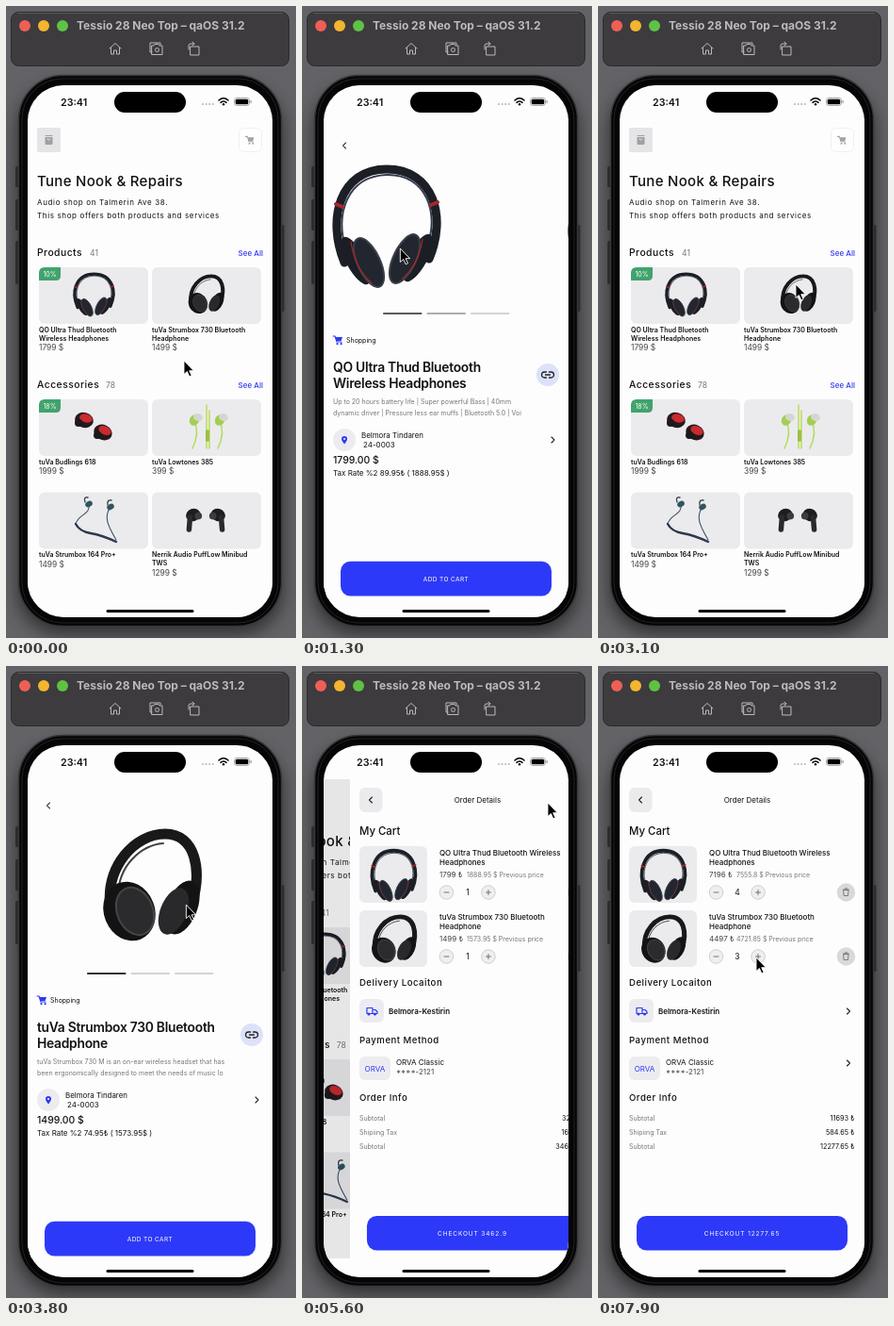
An HTML page that plays this animation: 308x670 px, repeating every 8 s.

```html
<!DOCTYPE html>
<html lang="en">
<head>
<meta charset="utf-8">
<title>Audio shop app</title>
<style>
html, body { margin: 0; width: 100%; height: 100%; overflow: hidden; background: #606064; }
svg { display: block; width: 308px; height: 670px; }
text { font-family: Inter, Roboto, sans-serif; fill: #111; white-space: pre; }
.m { font-weight: 550; }
.b { font-weight: 600; }
.g { fill: #777; }
.d { fill: #444; }
.blue { fill: #2d39f5; }
.w { fill: #fff; }
.end { text-anchor: end; }
.mid { text-anchor: middle; }
.line { fill: none; stroke: #222; stroke-linecap: round; stroke-linejoin: round; }
.band { fill: none; stroke: #1c1f25; stroke-linecap: round; }
.black { stroke: #19191a; }
</style>
</head>
<body>
<svg id="stage" viewBox="0 0 308 670"></svg>
<script>
const LOOP = 8000, WIDTH = 260;
const BLUE = '#2d39f8', CARD = '#ebebee';

// Markup helpers
const text = (x, y, size, str, cls = '', gap = 0, id = '') =>
  `<text x="${x}" y="${y}" font-size="${size}" class="${cls}" letter-spacing="${gap}" ${id && `id="${id}"`}>${str}</text>`;
const rect = (x, y, w, h, r, fill, more = '') =>
  `<rect x="${x}" y="${y}" width="${w}" height="${h}" rx="${r}" fill="${fill}" ${more}/>`;
const circle = (x, y, r, fill, more = '') => `<circle cx="${x}" cy="${y}" r="${r}" fill="${fill}" ${more}/>`;
const oval = (x, y, rx, ry, turn, fill, more = '') =>
  `<ellipse rx="${rx}" ry="${ry}" transform="translate(${x} ${y}) rotate(${turn})" fill="${fill}" ${more}/>`;
const line = (d, color = '#222', w = 1) => `<path class="line" d="${d}" style="stroke:${color};stroke-width:${w}"/>`;
const at = (x, y, sx, sy, body) => `<g transform="translate(${x} ${y}) scale(${sx} ${sy})">${body}</g>`;
const chevron = (x, y, dir, color = '#222') => line(`M${x - dir * 1.5} ${y - 3}l${dir * 3} 3l${-dir * 3} 3`, color, 1.1);

// Product pictures, centred on 0,0
const RED = '#a8272c', rim = 'stroke="#3a3e48" stroke-width="2"';
const frontView = `
  <path class="band" stroke-width="9" d="M-45 38C-64 -8 -50 -61 0 -61S64 -10 45 34"/>
  ${line('M-43 24C-56 -12 -42 -54 0 -55S56 -14 43 20', '#343b4e', 2)}
  ${line('M-54 -24l7 3M54 -26l-7 3', RED, 4)}
  ${oval(-33, 36, 10, 28, -28, '#1b1e25')}${oval(33, 33, 10, 28, 28, '#1b1e25')}
  ${oval(-19, 38, 12, 28, -25, '#22262f', rim)}${oval(19, 34, 12, 28, 25, '#22262f', rim)}
  ${line('M-38 16Q-34 44 -16 60M38 13Q34 40 17 55', RED, 1.2)}`;
const tiltView = `
  <path class="band" stroke-width="13" d="M-34 34C-74 6 -58 -28 -20 -42S40 -52 52 -16"/>
  ${line('M-40 20C-62 0 -44 -24 -14 -36S34 -42 42 -18', '#31384b', 2)}
  ${line('M18 -52l2 10M-60 -3l8 -1', RED, 4)}
  ${oval(39, -2, 14, 29, -8, '#14161b')}${oval(53, -3, 13, 28, -10, '#23262e', rim)}
  ${oval(9, 27, 27, 17, 35, '#14161b')}${line('M-14 8Q14 12 28 38M40 -28Q50 -2 44 22', RED, 1.8)}
  ${oval(-10, 31, 32, 18, 28, '#22252c', rim)}`;
const studioView = `
  <path class="band black" stroke-width="12" d="M-27 38C-38 -30 -20 -61 4 -61S28 -40 36 -16"/>
  ${line('M-20 20C-28 -26 -14 -50 5 -53', '#383838', 2)}
  ${oval(-14, 42, 23, 22, 20, '#101011')}${oval(-9, 42, 15, 17, 20, '#29292a')}
  ${oval(10, 13, 28, 31, 20, '#0e0e0f')}${oval(21, 9, 31, 30, 25, '#202021')}
  ${oval(26, 7, 23, 23, 25, '#2b2b2c')}${circle(34, 6, 7, '#e6e6e6')}`;
const pairView = `
  <path class="band black" stroke-width="11" d="M-42 24C-48 -22 -16 -56 16 -56S56 -18 44 20"/>
  ${line('M-34 10C-34 -22 -10 -44 14 -46', '#404042', 2)}
  ${oval(34, 22, 16, 30, 22, '#131314')}${oval(25, 26, 14, 26, 22, '#29292b')}
  ${oval(-22, 26, 27, 32, -22, '#131314')}${oval(-16, 26, 19, 26, -22, '#2b2b2d', 'stroke="#454547" stroke-width="2"')}`;

const redBuds = [[-10, -6, 15], [10, 7, 25]].map(([x, y, r]) =>
  oval(x, y, 10, 8, r, '#25191b') + oval(x + 2, y - 2, 7, 4.5, r, '#c92a30') + circle(x - 6, y + 3, 4, '#1a1a1d')).join('');
const limeBuds = [-13, 14].map(x =>
  line(`M${x} -8Q${x + 6} 6 ${x - 2} 22`, '#b4dc5a', 1.5) + oval(x, -8, 5, 6, 25, '#a5cc55') +
  oval(x + 4, -11, 5, 4, 15, '#d3d8cc')).join('') + line('M0 -24V22M3 -18V22', '#b9e052', 1.5) + rect(-1, 2, 4, 13, 2, '#9cc044');
const neckBuds = line('M-5 -18C-3 -6 -16 -8 -19 3M18 -15C10 -4 16 6 24 20', '#3a5268', 1.1) +
  line('M-19 3Q-15 11 -3 13T24 22', '#2c3a4c', 2.4) +
  line('M-9 -20q-2 -6 3 -5M15 -17q-1 -6 4 -5', '#31393f', 1.3) +
  oval(-5, -18, 4, 3, -30, '#2e5560') + oval(18, -15, 4, 3, -30, '#2e5560');
const blackBuds = [-12, 12].map(x => {
  const s = Math.sign(x);
  return oval(x, -5, 7, 6, 20 * s, '#1d1d20') + line(`M${x + s * 3} -3l${s} 12`, '#2a2a2e', 5) + circle(x - s * 5, -4, 3.5, '#3b3b40');
}).join('');

const products = [
  { name: ['QO Ultra Thud Bluetooth', 'Wireless Headphones'], price: 1799,
    about: ['Up to 20 hours battery life | Super powerful Bass | 40mm', 'dynamic driver | Pressure less ear muffs | Bluetooth 5.0 | Voi'],
    views: [frontView, `<g transform="scale(-1 1)">${tiltView}</g>`, tiltView] },
  { name: ['tuVa Strumbox 730 Bluetooth', 'Headphone'], price: 1499,
    about: ['tuVa Strumbox 730 M is an on-ear wireless headset that has', 'been ergonomically designed to meet the needs of music lo'],
    views: [pairView, studioView, pairView] }
];

// Pages
const tile = (x, y, names, price, pic, badge) => rect(x, y, 116, 60, 6, CARD) + pic +
  (badge ? `<path d="M${x + 6} ${y}h17v9q0 5 -5 5h-18v-8q0 -6 6 -6z" fill="#42a36c"/>` + text(x + 11.5, y + 9.8, 7, badge, 'w mid') : '') +
  names.map((n, i) => text(x, y + 68.5 + i * 9, 7, n, 'b')).join('') +
  text(x, y + 79 + (names.length - 1) * 9.2, 8.4, price + ' $', 'd');
const heading = (y, name, count) => text(33, y, 10.3, name, 'm', .5) + text(count > 50 ? 106 : 89, y, 8.6, count, 'g') +
  text(273, y - .5, 8, 'See All', 'blue m end');
const trolley = (x, y, s, color) => at(x, y, s, s,
  line('M-5 -4h2l2 6h5', color, 1.2) + `<path d="M-2.5 -3h7.5l-1.5 4h-5z" fill="${color}"/>` + circle(-.5, 4.2, 1.1, color) + circle(3.6, 4.2, 1.1, color));

const home = rect(23, 120, WIDTH, 508, 0, '#fdfdfd') +
  rect(33, 129, 25, 26, 2, '#e5e5e8') +
  '<path d="M41.500 139h8v7q0 1 -1 1h-6q-1 0 -1 -1z" fill="#a0a0a4"/>' + line('M42 137.500h7', '#a0a0a4', 1.2) + line('M44 141q1.500 2.500 3 0', '#eee') +
  rect(247.5, 129.5, 24, 25, 5, '#fefefe', 'stroke="#f0f0f2"') + trolley(259, 142, .9, '#a2a2a6') +
  text(33, 190.5, 15, 'Tune Nook &amp; Repairs', 'm', .3) +
  text(33, 211, 8, 'Audio shop on Talmerin Ave 38.', '', .65) +
  text(33, 225, 8, 'This shop offers both products and services', '', .63) +
  heading(265, 'Products', 41) + heading(405, 'Accessories', 78) +
  tile(35, 277, products[0].name, 1799, at(93.5, 306, .385, .36, frontView), '10%') +
  tile(155, 277, products[1].name, 1499, at(212, 306, .37, .35, pairView)) +
  tile(35, 417, ['tuVa Budlings 618'], 1999, at(93, 445, 1, 1, redBuds), '18%') +
  tile(155, 417, ['tuVa Lowtones 385'], 399, at(213, 447, 1, 1, limeBuds)) +
  tile(35, 515.5, ['tuVa Strumbox 164 Pro+'], 1499, at(93, 546, 1, 1, neckBuds)) +
  tile(155, 515.5, ['Nerrik Audio PuffLow Minibud', 'TWS'], 1299, at(212, 545, 1.1, 1.1, blackBuds)) +
  rect(23, 120, WIDTH, 508, 0, '#000', 'id="dim"');

const detail = (p, n) => rect(23, 120, WIDTH, 508, 0, '#fdfdfd') + chevron(45, 148, -1, '#444') +
  `<g id="views${n}">${p.views.map((v, i) => at(153 + i * WIDTH, 234, 1, 1, v)).join('')}</g>` +
  [0, 1, 2].map(i => rect(86 + i * 46.5, 325.2, 41.5, 1.5, .7, '#c6c6c6') + rect(86 + i * 46.5, 325.2, 41.5, 1.5, .7, '#000', `id="bar${n}${i}"`)).join('') +
  trolley(38, 354, 1, BLUE) + text(47, 357, 7, 'Shopping') +
  p.name.map((s, i) => text(33, 387.5 + i * 17, 13.8, s, 'b', -.25)).join('') +
  circle(261, 391, 12, '#dbe2fa') + line('M259.5 388h-2a3 3 0 0 0 0 6h2M262.5 388h2a3 3 0 0 1 0 6h-2M258.5 391h5', '#222', 1.3) +
  p.about.map((s, i) => text(33, 421.5 + i * 12, 7, s, 'g')).join('') +
  circle(45, 460, 12, '#ececf0') + `<path d="M45 464.5q-3 -4 -3 -5.5a3 3 0 0 1 6 0q0 1.5 -3 5.5z" fill="${BLUE}"/>` + circle(45, 459, 1, '#fff') +
  text(63, 458, 7.9, 'Belmora Tindaren') + text(65, 468, 8, '24-0003') + chevron(266.5, 460, 1) +
  text(33, 485, 10.4, p.price.toFixed(2) + ' $', 'm') +
  text(33, 498, 8, `Tax Rate %2 ${(p.price * .05).toFixed(2)}₺ ( ${(p.price * 1.05).toFixed(2)}$ )`) +
  rect(41, 588.7, 224, 36.8, 10.5, BLUE) + rect(41, 588.7, 224, 36.8, 10.5, '#c1cdfc', `id="press${n}"`) +
  text(153, 609.5, 6.5, 'ADD TO CART', 'w mid', .4);

const knob = (x, y, plus) => circle(x, y, 7.3, '#efeff0', 'stroke="#c4c4c6" stroke-width=".8"') +
  line(`M${x - 2.5} ${y}h5` + (plus ? `M${x} ${y - 2.5}v5` : ''), '#666', .9);
const item = (n, y, lines, pic) => rect(33, y, 72, 60, 6, CARD) + pic +
  lines.map((s, i) => text(118, y + 10 + i * 10, 8, s, 'm')).join('') +
  text(118, y + 33, 8, '', 'd', 0, 'cost' + n) + text(147, y + 33, 7, '', 'g', 0, 'prev' + n) +
  knob(125.5, y + 49, 0) + knob(170, y + 49, 1) + text(148, y + 52, 8.5, '', 'mid', 0, 'qty' + n) +
  circle(263.5, y + 49, 9.7, '#d9d9db') + line(`M261 ${y + 46.5}h5l-.5 6h-4zM260.5 ${y + 46}h6M262.5 ${y + 44.8}h2`, '#666', .8);
const row = (y, name, id) => text(33, y, 7, name, 'g') + text(272.5, y, 7.3, '', 'end', 0, id);

const cart = rect(23, 120, WIDTH, 508, 0, '#fdfdfd') + rect(33, 129, 24.5, 26, 6, '#ebebed') + chevron(45, 142, -1) +
  text(158.5, 145, 8, 'Order Details', 'mid') + text(33, 179, 11.4, 'My Cart', 'm') +
  item(0, 191, ['QO Ultra Thud Bluetooth Wireless', 'Headphones'], at(69.5, 222, .43, .43, frontView)) +
  item(1, 259, products[1].name, at(69, 290, .46, .43, pairView)) +
  text(33, 339, 9.6, 'Delivery Locaiton', 'm', .5) +
  rect(33, 353, 26, 25, 6, '#ececf0') + line('M41 362.5h6v6h-6zM47 364.5h3l2 2v2h-5', BLUE, 1.2) + circle(43, 369, 1.5, BLUE) + circle(49.5, 369, 1.5, BLUE) +
  text(64, 369, 8, 'Belmora-Kestirin', 'b') + chevron(266, 366, 1) +
  text(33, 400, 9.6, 'Payment Method', 'm', .5) + rect(33, 414, 33, 25, 6, '#ececf0') + text(49.5, 429.5, 8, 'ORVA', 'blue mid') +
  text(72, 423, 8, 'ORVA Classic') + text(72, 433, 8, '****-2121', 'd') + chevron(266, 421, 1) +
  text(33, 460.5, 9.6, 'Order Info', 'm', .5) +
  row(482, 'Subtotal', 'sum') + row(496.5, 'Shipiing Tax', 'tax') + row(511.5, 'Subtotal', 'total') +
  rect(41, 583, 224, 36.5, 10.5, BLUE) + text(153, 603.8, 6.5, '', 'w mid', .9, 'checkout');

const page = (id, body) => `<g id="${id}" clip-path="url(#view)">${body}</g>`;
const shell = rect(0, 0, 308, 670, 0, '#636367') +
  rect(12, 84, 282, 582, 47, '#000', 'filter="url(#soft)" opacity=".5"') +
  rect(5.5, 6.5, 295, 57, 8, '#3d3b3d', 'stroke="#2b2a2c"') + line('M13 7.5h280', '#6a686b', .7) +
  ['#ee5f57', '#f3b52f', '#5ec244'].map((c, i) => circle(20 + i * 20, 21, 6, c)).join('') +
  '<text x="75" y="25" font-size="12" font-weight="700" style="fill:#bcbabd">Tessio 28 Neo Top – qaOS 31.2</text>' +
  line('M110 45l6 -5.5 6 5.5M111.5 44.5v6.500h3v-4h3v4h3v-6.500', '#bbb') +
  line('M155 49h-2v-10h11v2M155 42h2l1 -1.5h4l1 1.5h3v9.5h-11z', '#bbb') + circle(160.5, 46.5, 2, 'none', 'stroke="#bbb"') +
  line('M196 43h9v9h-9zM194 46v-4q0 -2 2 -2h4M198 38l2 2 -2 2', '#bbb') +
  [[10, 170, 22], [10, 205, 33], [10, 249, 46], [290, 232, 92]].map(([x, y, h]) => rect(x, y, 5.5, h, 1.5, '#2c2c2f')).join('') +
  rect(13.5, 73.5, 279, 584, 47, '#050506', 'stroke="#37373a" stroke-width="1.5"') + rect(17, 77, 272, 577, 43, 'none', 'stroke="#222225"') +
  rect(23, 84, WIDTH, 564, 38, '#fdfdfd');
const status = text(58, 106, 10.7, '23:41', 'b') + rect(115, 91, 76, 22, 11, '#000') +
  [0, 1, 2, 3].map(i => circle(209 + i * 3.6, 104, 1.1, '#bbb')).join('') +
  line('M226 100q5 -4.5 10 0M228 102.3q3 -2.6 6 0', '#000', 1.6) + circle(231, 104.3, 1.2, '#000') +
  rect(242.5, 97.5, 16, 8, 2.5, 'none', 'stroke="#999" stroke-width=".8"') + rect(243.7, 98.7, 13.6, 5.6, 1.5, '#000') + rect(259.5, 100, 1.2, 3, .6, '#999') +
  rect(106.5, 640, 93, 3, 1.5, '#000');

document.getElementById('stage').innerHTML =
  `<defs><clipPath id="view"><rect x="23" y="120" width="${WIDTH}" height="508"/></clipPath>
  <clipPath id="glass"><rect x="23" y="84" width="${WIDTH}" height="564" rx="38"/></clipPath>
  <filter id="soft" x="-20%" y="-20%" width="140%" height="140%"><feGaussianBlur stdDeviation="9"/></filter></defs>` +
  shell + '<g clip-path="url(#glass)"><g clip-path="url(#view)">' + page('home', home) +
  products.map((p, i) => page('detail' + i, detail(p, i))).join('') + page('cart', cart) + '</g></g>' +
  status + '<path id="cursor" d="M0 0V14.5l3.4 -3 2.4 5.3 2.3 -1 -2.4 -5.1H10.3Z" fill="#000" stroke="#fff" stroke-width=".9"/>';

// Motion
const $ = id => document.getElementById(id);
const clamp = v => Math.min(1, Math.max(0, v));
const smooth = u => (u = clamp(u), u * u * (3 - 2 * u));
const settle = u => 1 - (1 - clamp(u)) ** 3.2;
const move = (id, x, y = 0) => $(id).setAttribute('transform', `translate(${x} ${y})`);
const put = (id, s) => { if ($(id).textContent !== s) $(id).textContent = s; };
const money = v => String(+v.toFixed(2));

const visits = [['detail0', 480, 2520], ['detail1', 3170, 4930], ['cart', 5350, 9e9]];
const swipes = [[[1160, 1600], [1690, 1990]], [[4000, 4340]]];
const presses = [2230, 4620];
const taps = [[6500, 6750, 7000], [7500, 7750]];
const trail = [
  [0, 189, 376], [60, 189, 376], [420, 95, 303], [560, 95, 303], [1100, 168, 258], [1160, 168, 258], [1440, 42, 256],
  [1660, 176, 258], [1700, 176, 258], [1840, 70, 257], [2100, 126, 567], [2200, 128, 600], [2270, 128, 600],
  [2480, 45, 147], [2640, 45, 147], [3080, 210, 295], [3280, 210, 295], [3900, 190, 250], [4000, 190, 250],
  [4200, 75, 248], [4560, 129, 602], [4740, 129, 602], [4900, 45, 147], [5020, 45, 147], [5310, 259, 143],
  [5600, 261, 145], [5850, 261, 145], [6350, 169, 240], [7100, 169, 240], [7380, 168, 309], [LOOP, 168, 309]
];

function draw(t) {
  let cover = 0;
  for (const [id, start, end] of visits) {
    const p = settle((t - start) / 500) * (1 - settle((t - end) / 420));
    move(id, WIDTH * (1 - p));
    $(id).setAttribute('visibility', p > 0 ? 'visible' : 'hidden');
    cover = Math.max(cover, p);
  }
  move('home', -77.5 * cover);
  $('dim').setAttribute('opacity', .1 * cover);

  swipes.forEach((list, n) => {
    const pos = list.reduce((sum, [a, b]) => sum + smooth((t - a) / (b - a)), 0);
    move('views' + n, -pos * WIDTH);
    for (let i = 0; i < 3; i++) $(`bar${n}${i}`).setAttribute('opacity', clamp(1 - Math.abs(pos - i)));
    const since = t - presses[n];
    $('press' + n).setAttribute('opacity', since < 0 ? 0 : clamp(since / 50) * (1 - smooth((since - 120) / 160)));
  });

  let sum = 0;
  taps.forEach((times, n) => {
    const qty = 1 + times.filter(x => t >= x).length, cost = qty * products[n].price;
    sum += cost;
    put('qty' + n, String(qty));
    put('cost' + n, cost + ' ₺');
    put('prev' + n, money(cost * 1.05) + ' $ Previous price');
  });
  put('sum', sum + ' ₺');
  put('tax', money(sum * .05) + ' ₺');
  put('total', money(sum * 1.05) + ' ₺');
  put('checkout', 'CHECKOUT ' + money(sum * 1.05));

  const k = trail.findIndex(s => s[0] > t), [t0, x0, y0] = trail[k - 1], [t1, x1, y1] = trail[k];
  const u = smooth((t - t0) / (t1 - t0));
  move('cursor', x0 + (x1 - x0) * u, y0 + (y1 - y0) * u);
}

function tick() {
  draw(performance.now() % LOOP);
  requestAnimationFrame(tick);
}
tick();
</script>
</body>
</html>
```
